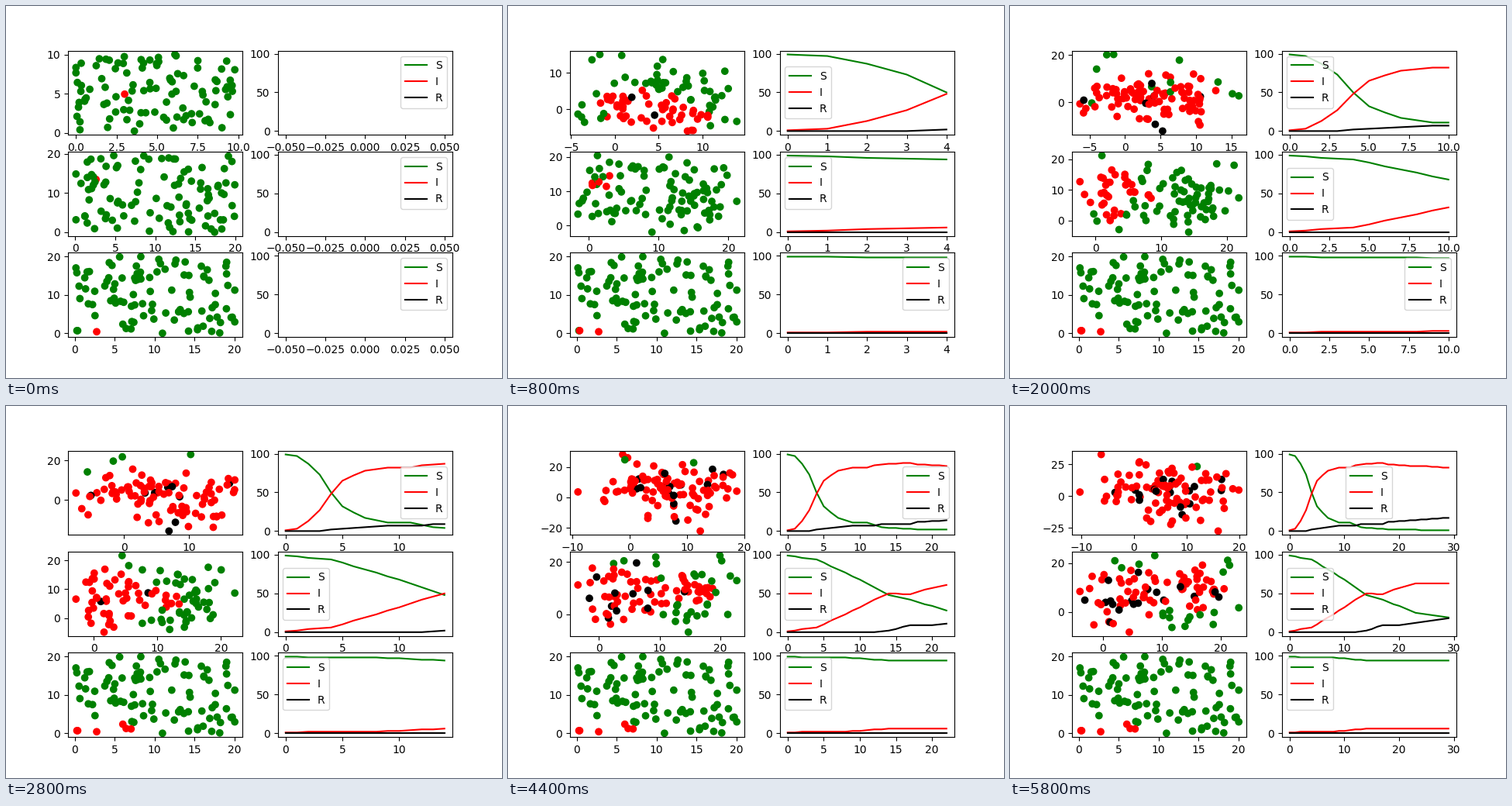
Write a matplotlib script that moves like this. It is 640 px wide and 480 px high and loops after 6000 ms.

```python
import numpy as np
import matplotlib.pyplot as plt
from matplotlib.animation import FuncAnimation

STEPS, PEOPLE = 30, 100
COLORS = np.array(["green", "red", "black"])
GROWTH = np.array([.45, .45, .75, .75])  # how x and y bounds widen with time


def fit(points, box):
    """Scale the points so that they just fill the box x0, x1, y0, y1."""
    lo, hi = points.min(axis=0), points.max(axis=0)
    x0, x1, y0, y1 = box
    return (x0, y0) + (points - lo) / (hi - lo) * (x1 - x0, y1 - y0)


def wander(rng, first, stride, start, end):
    """Random walk of the crowd while its bounds widen from start to end."""
    start, end = np.array(start), np.array(end)
    crowd = fit(rng.random((PEOPLE, 2)), start)
    crowd[0] = first
    path = [crowd]
    for k in range(1, STEPS):
        box = start + (end - start) * (k / (STEPS - 1)) ** GROWTH
        crowd = fit(crowd + rng.normal(size=crowd.shape) * stride, box)
        path.append(crowd)
    return path


def curve(*keys):
    """Whole head counts along straight runs between (step, count) keys."""
    steps, counts = zip(*keys)
    return np.rint(np.interp(range(STEPS), steps, counts)).astype(int)


def spread(rng, path, well, cured):
    """State of each person per step: the closest neighbours catch it."""
    state = np.zeros(PEOPLE, int)
    state[0] = 1
    history = [state.copy()]
    for k in range(1, STEPS):
        sick, fresh = np.flatnonzero(state == 1), np.flatnonzero(state == 0)
        healed = rng.choice(sick, cured[k] - cured[k - 1], replace=False)
        gap = np.linalg.norm(path[k][fresh, None] - path[k][None, sick], axis=2)
        order = gap.min(axis=1).argsort()
        state[fresh[order[:well[k - 1] - well[k]]]] = 1
        state[healed] = 2
        history.append(state.copy())
    return history


def outbreak(rng, path, well, cured):
    counts = well, PEOPLE - well - cured, cured
    return path, spread(rng, path, well, cured), counts


rng = np.random.default_rng(7)
home = (.15, 20.05, 0, 19.95)
rows = [
    outbreak(rng,
             wander(rng, (3, 4.95), (.85, 1.6),
                    (0, 9.78, .25, 10), (-10.25, 19.9, -27.4, 32.6)),
             curve((0, 99), (1, 97), (2, 87), (3, 73), (4, 50), (5, 32), (7, 17),
                   (9, 11), (11, 11), (13, 5), (18, 2), (29, 1)),
             curve((3, 0), (4, 2), (9, 7), (12, 7), (13, 9), (17, 9), (18, 12),
                   (29, 17))),
    outbreak(rng,
             wander(rng, (2.6, 13.5), (.55, .9),
                    (.1, 19.9, 0, 19.6), (-3.9, 23.05, -8.4, 23.2)),
             curve((0, 99), (4, 94), (10, 68), (14, 48), (17, 42), (23, 25),
                   (29, 19)),
             curve((12, 0), (14, 2), (17, 9), (20, 9), (29, 18))),
    outbreak(rng,
             wander(rng, (2.75, .4), 0, home, home),
             curve((1, 99), (2, 98), (8, 98), (14, 94)),
             curve((0, 0), (29, 0))),
]

fig, axes = plt.subplots(3, 2, figsize=(6.4, 4.8), dpi=100)


def draw(k):
    for (crowd_ax, curve_ax), (path, states, counts) in zip(axes, rows):
        crowd_ax.clear()
        crowd_ax.scatter(*path[k].T, c=COLORS[states[k]])
        curve_ax.clear()
        for count, color, label in zip(counts, COLORS, "SIR"):
            curve_ax.plot(range(k + 1), count[:k + 1], color=color, label=label)
        curve_ax.legend(loc="best")


anim = FuncAnimation(fig, draw, frames=STEPS, interval=200, repeat=True)
plt.show()
```
